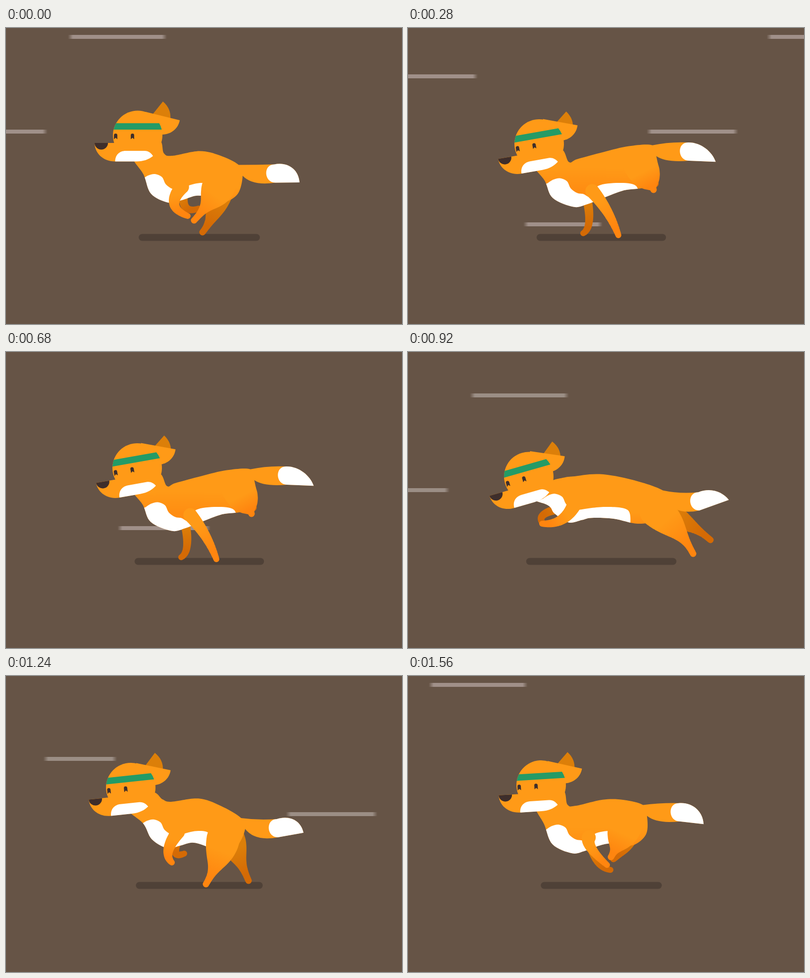
Recreate the animation shown at these times as an HTML page with a canvas. Size 800x600 px, loop 1600 ms.

```html
<!DOCTYPE html>
<html lang="en">
<head>
<meta charset="utf-8">
<title>Running fox</title>
<style>
html, body { margin: 0; width: 100%; height: 100%; overflow: hidden; background: #665446; }
canvas { display: block; width: 800px; height: 600px; }
</style>
</head>
<body>
<canvas id="stage" width="800" height="600"></canvas>
<script>
const ctx = document.getElementById('stage').getContext('2d');
const STEP = 40, STEPS = 40, STRIDE = 400;
const ORANGE = '#ff9a17', DEEP = '#ff850f', DARK = '#3e2e2b', WHITE = '#fff';
const SHADE = '#dc7f09', DEEP_SHADE = '#d46a05', RAD = Math.PI / 180;

// Key poses of the stride in ms; everything else follows from these and a few waves.
const headKeys = { // x, y, tilt
  0: [266, 217.5, 0], 40: [252, 226, -6], 120: [244, 252.5, -16],
  280: [265, 235, -10], 360: [269, 221, -3.5]
};
const legKeys = { // knee, toe
  nearFront: {
    0: [340, 357, 367, 381], 40: [328, 353, 335, 378], 120: [308, 341, 271, 348],
    200: [295, 378, 270, 404], 280: [403, 373, 425, 420], 360: [371, 350, 402, 383]
  },
  farFront: {
    0: [362, 362, 389, 366], 40: [342, 356, 360, 360], 120: [278, 327, 273, 348],
    200: [272, 380, 250, 400], 280: [366, 388, 354, 416], 360: [382, 374, 409, 393]
  },
  nearHind: {
    0: [411, 352, 380, 390], 40: [425, 378, 404, 422], 120: [545, 363, 576, 409],
    280: [488, 311, 496, 328], 360: [424, 339, 410, 367]
  },
  farHind: {
    0: [419, 374, 397, 414], 40: [470, 368, 490, 415], 120: [564, 348, 611, 381],
    280: [489, 300, 500, 316], 360: [433, 346, 415, 371]
  }
};

// Wind streaks: y, width, left edge, step at that edge. The first three return later and lower.
const WIND = 83.3;
const streaks = [[14, 200, 125, 0], [206, 185, -101, 0], [94, 149, -8, 7], [394, 160, 233, 7], [353, 188, -108, 13]];
const echoes = streaks.slice(0, 3).map(([y, w, x, s]) => [y + 70, w, x, s + 23]);

// Smooth periodic interpolation through unevenly spaced keys.
function sample(track, t) {
  const keys = Object.keys(track).map(Number), n = keys.length;
  if (track[t]) return track[t];
  let i = n - 1;
  while (keys[i] > t) i--;
  const at = k => keys[(k + n) % n] + Math.floor(k / n) * STRIDE;
  const val = k => track[keys[(k + n) % n]];
  const [ta, tb, tc, td] = [i - 1, i, i + 1, i + 2].map(at);
  const [a, b, c, d] = [i - 1, i, i + 1, i + 2].map(val);
  const h = tc - tb, u = (t - tb) / h, v = 1 - u;
  return b.map((p, k) => {
    const m = (c[k] - a[k]) / (tc - ta) * h, q = (d[k] - p) / (td - tb) * h;
    return v * v * (1 + 2 * u) * p + u * v * v * m + u * u * (1 + 2 * v) * c[k] - u * u * v * q;
  });
}

const from = ([x, y]) => (dx, dy) => [x + dx, y + dy];
const mid = (a, b) => [(a[0] + b[0]) / 2, (a[1] + b[1]) / 2];

function spline(pts, closed) {
  const path = new Path2D(), n = pts.length;
  const at = i => closed ? pts[(i + n) % n] : pts[Math.max(0, Math.min(n - 1, i))];
  path.moveTo(...pts[0]);
  for (let i = 0; i < n - (closed ? 0 : 1); i++) {
    const [a, b, c, d] = [at(i - 1), at(i), at(i + 1), at(i + 2)];
    path.bezierCurveTo(b[0] + (c[0] - a[0]) / 6, b[1] + (c[1] - a[1]) / 6,
      c[0] - (d[0] - b[0]) / 6, c[1] - (d[1] - b[1]) / 6, c[0], c[1]);
  }
  return path;
}

function fill(shape, color) {
  ctx.fillStyle = color;
  ctx.fill(typeof shape === 'string' ? new Path2D(shape) : shape);
}

function fade(x0, y0, x1, y1, stops) {
  const g = ctx.createLinearGradient(x0, y0, x1, y1);
  for (const [at, color] of stops) g.addColorStop(at, color);
  return g;
}

// All joints of the fox at time t of the stride.
function pose(t) {
  const a = t / STRIDE * 2 * Math.PI, c = Math.cos(a), s = Math.sin(a);
  const head = sample(headKeys, t);
  const chest = [329 - c - 5 * s, 311 - 9 * s];
  const root = [496 - 26 * c + 8 * s - 4.8 * Math.sin(2 * a), 263.5 + 14 * c + 22.5 * s];
  const legs = {};
  for (const name in legKeys) {
    const [kx, ky, tx, ty] = sample(legKeys[name], t);
    const hip = /Front/.test(name)
      ? from(chest)(20 + .2 * (tx - chest[0]), 11)
      : from(root)(-24 + .17 * (tx - root[0]), 41);
    legs[name] = [hip, [kx, ky], [tx, ty]];
  }
  return { c, s, head, chest, root, legs };
}

// A limb is a row of discs along hip, knee and toe; girth(u) is the radius.
function drawLeg([hip, knee, toe], girth, light, deep) {
  const shape = new Path2D(), n = 40;
  const tan = [(toe[0] - hip[0]) / 2, (toe[1] - hip[1]) / 2];
  for (let i = 0; i <= 2 * n; i++) {
    const [p, q, dir, u] = i < n ? [hip, knee, 1, i / n] : [toe, knee, -1, 2 - i / n];
    const [x, y] = [0, 1].map(k => {
      const ctrl = q[k] - dir * tan[k] / 2;
      const bend = (1 - u) * (1 - u) * p[k] + 2 * u * (1 - u) * ctrl + u * u * q[k];
      return bend;
    });
    const r = girth(i / n / 2);
    shape.moveTo(x + r, y);
    shape.arc(x, y, r, 0, 7);
  }
  fill(shape, fade(...hip, ...toe, [[.25, light], [.85, deep]]));
}

const armGirth = size => u => 6 + size * (1 - u);
const thighGirth = size => u => 6.5 + size * Math.pow((1 + Math.cos(Math.PI * u)) / 2, 1.3);

function drawTail({ root, c, s }) {
  const at = from(root), top = at(72, -1 + 5 * s), low = at(74, 36 + 5 * s);
  const tip = at(129 - 6 * c + 3 * s, 28.5 + 7 * c - 7.5 * s);
  const brush = path => {
    path.bezierCurveTo(...at(98, -6.5), ...at(121, 8 - 5 * s), ...tip);
    path.lineTo(...low);
  };
  const tail = new Path2D(), end = new Path2D();
  tail.moveTo(...at(-15, 14));
  tail.lineTo(...root);
  tail.quadraticCurveTo(...at(35, 8 * s), ...top);
  brush(tail);
  tail.quadraticCurveTo(...at(28, 43 + 8 * s), ...at(8, 22));
  fill(tail, ORANGE);
  end.moveTo(...top);
  brush(end);
  end.bezierCurveTo(low[0] - 23, low[1], top[0] - 23, top[1], ...top);
  fill(end, WHITE);
}

function drawBody({ head, chest, root, legs, c, s }) {
  const h = from(head), b = from(chest), r = from(root);
  const waist = [384 - 13 * s, 340 - 4 * s], ridge = [391 - 4 * s, 249.5 - 2 * s];
  const haunch = r(-32 - 20 * s, 76 - 9 * s);
  const body = spline([
    h(-11, 37), from(mid(head, chest))(-14 - 5 * c + 11 * s, 33),
    b(-35 + 7 * s, 25), b(0, 43), b(27, 38),
    waist, from(mid(waist, haunch))(-2, -4), haunch,
    r(-2 - 14 * s, 59), r(8, 22), root,
    from(mid(ridge, root))(2, -5), ridge,
    b(8, -52 + 2 * s), b(-9, -50 - 7 * c), h(42, 10)
  ], true);
  fill(body, fade(0, root[1] + 45, 0, haunch[1] + 5, [[0, ORANGE], [1, '#ff8d12']]));

  // White chest, hidden under the shoulder, then white belly.
  const hip = legs.nearFront[0], front = hip[0] + 12, rear = haunch[0] - 14;
  const under = spline([
    b(-52, -5), b(-41, -12), b(-27, -15), b(-13, -9), b(-5, 6), b(8, 15), b(20, 17),
    from(hip)(-2, 12), [front, 320], [(front + rear) / 2, 314], [rear - 6, 320], [rear, 350]
  ]);
  under.lineTo(rear, 460);
  under.lineTo(chest[0] - 64, 460);
  under.lineTo(chest[0] - 64, chest[1]);
  ctx.save();
  ctx.clip(body);
  fill(under, WHITE);
  ctx.restore();
}

function drawHead({ head: [x, y, tilt], s }) {
  ctx.save();
  ctx.translate(x, y);
  ctx.save();
  ctx.rotate(-3.2 * s * RAD);
  fill('M31-43.5L51-68.5Q68-54 66-33L40-25Z', SHADE);
  ctx.restore();
  ctx.rotate(tilt * RAD);

  // The near ear swings against the tilt of the head.
  ctx.save();
  ctx.translate(24, -46);
  ctx.rotate(-.65 * tilt * RAD);
  fill('M-8-1.5L61 15.5C58 32 44 44 26 44.5L-4 41Z', ORANGE);
  ctx.restore();

  const skull = new Path2D(), nose = new Path2D(), band = new Path2D();
  skull.arc(0, 0, 50, 0, 7);
  fill(skull, ORANGE);
  fill('M-40 15.5H-87C-87 36-70 53-46 53H-3L20 20Z', ORANGE);
  fill('M-45.5 53C-45.5 40-37 31.5-24 31.5H14C22 31.5 27 36 31 42C22 49 12 53-3 53Z', WHITE);
  nose.arc(-73.5, 15.5, 13.5, 0, Math.PI);
  fill(nose, DARK);
  band.arc(0, 0, 50, -.512, -.232);
  band.arc(0, 0, 50, Math.PI + .232, Math.PI + .512);
  fill(band, '#249b66');
  for (const ex of [-44.5, -10.5])
    fill(`M${ex - 3.4} 8V0a3.4 3.4 0 0 1 6.8 0V8L${ex} 5Z`, DARK);
  ctx.restore();
}

function drawStreak(step, [y, w, x0, s0], rgb) {
  const n = (step - s0 + 8 + STEPS) % STEPS - 8;
  let x = x0 + n * WIND;
  x += 4 * Math.max(0, x - 704); // a last burst off the stage
  if (x > 800 || x + w < 0) return;
  const solid = `rgb(${rgb})`, clear = `rgba(${rgb},0)`, e = 10 / w;
  ctx.fillStyle = fade(x, 0, x + w, 0, [[0, clear], [e, solid], [1 - e, solid], [1, clear]]);
  ctx.fillRect(x, y, w, 8);
}

function drawShadow(t) {
  const a = t / STRIDE * 2 * Math.PI, path = new Path2D();
  const half = 136.8 - 14.4 * Math.cos(a) + 9.4 * Math.sin(a) - 2.7 * Math.sin(2 * a);
  path.roundRect(390.5 - half, 417.5, half * 2, 14, 7);
  fill(path, '#4f4137');
}

function draw(step) {
  const t = step * STEP % STRIDE, fox = pose(t), legs = fox.legs;
  ctx.fillStyle = '#665446';
  ctx.fillRect(0, 0, 800, 600);
  drawShadow(t);
  for (const s of streaks) drawStreak(step, s, '160,144,137');
  for (const s of echoes) drawStreak(step, s, '155,142,133');
  drawLeg(legs.farHind, thighGirth(22), SHADE, DEEP_SHADE);
  drawLeg(legs.farFront, armGirth(4), SHADE, DEEP_SHADE);
  drawTail(fox);
  drawBody(fox);
  drawLeg(legs.nearHind, thighGirth(27), ORANGE, DEEP);
  drawLeg(legs.nearFront, armGirth(8), ORANGE, DEEP);
  drawHead(fox);
}

const start = performance.now();
function tick() {
  draw(Math.floor((performance.now() - start) / STEP) % STEPS);
  requestAnimationFrame(tick);
}
tick();
</script>
</body>
</html>
```
